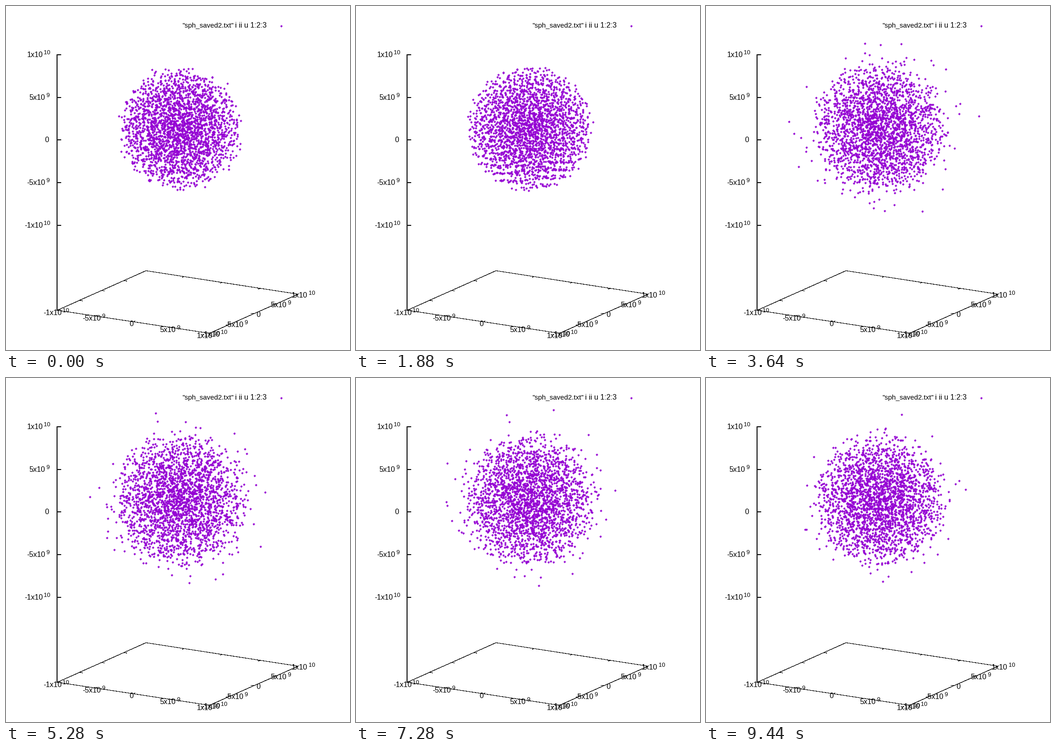
Write a matplotlib script that moves like this. It is 748 by 748 pixels and loops after 9480 ms.

```python
import numpy as np
import matplotlib.pyplot as plt
from matplotlib.animation import FuncAnimation

SIZE, DPI = 748, 88
PT = 72 / DPI              # points per pixel
STEP, FRAMES = 40, 237
VIOLET = "#9400d3"
CENTER = np.array([377.0, 267.0])
RADIUS = 137
COUNT = 2450

fig = plt.figure(figsize=(SIZE / DPI, SIZE / DPI), dpi=DPI, facecolor="white")
ax = fig.add_axes([0, 0, 1, 1])
ax.set(xlim=(0, SIZE), ylim=(SIZE, 0))
ax.axis("off")


def diamond():
    """Stepped diamond, five pixels across, from one quarter turned around."""
    quarter = [(0, -2), (1, -2), (1, -1), (2, -1), (2, 0)]
    outline = []
    for _ in range(4):
        outline += quarter[:-1] if outline else quarter
        quarter = [(1 - y, x) for x, y in quarter]
    return outline


def line(p, q):
    """Hairline between two pixels, one pixel wide and without smoothing."""
    x, y = np.transpose([p, q])
    ax.plot(x + 0.4, y + 0.6, color="black", lw=0.1 * PT,
            antialiased=False, zorder=2)


def text(x, y, s, px=16):
    ax.text(x, y, s, fontsize=px * PT, family="Liberation Sans",
            va="baseline", zorder=4)


def number(x, y, value, align):
    """Label of a tick in units of 5e9; align is 0.5 for centre, 1 for right."""
    if value == 0:
        text(x - 8.9 * align, y + 6, "0")
        return
    sign = "-" if value < 0 else ""
    mantissa, exponent = ("1", "10") if abs(value) == 2 else ("5", "9")
    base = 34.7 + 5.3 * len(sign)
    left = x - align * (base + 3 + 5 * len(exponent))
    text(left, y + 6, f"{sign}{mantissa}x10")
    text(left + base + 2, y, exponent, 12.8)


def draw_axes():
    a, b, c, d = np.array([(111, 661), (304, 575), (635, 626), (442, 711)])
    line((111, 105), a)
    for p, q in ((a, b), (b, c), (c, d), (d, a)):
        line(p, q)
    along_x, along_y = (c - b) * 0.02, (b - a) * 0.02
    for value in range(-2, 3):
        f = (value + 2) / 4
        z = round(476 - 371 * f)
        line((111, z), (119, z))
        number(93.4, z, value, 1)
        on_x, on_y = a + f * (d - a), d + f * (c - d)
        number(on_x[0] - 3.5, on_x[1] + 4.5, value, 0.5)
        number(on_y[0] + 10, on_y[1] + 2, value, 0.5)
        if abs(value) < 2:
            line(on_x, on_x + along_y)
            line(on_y, on_y - along_x)
            line(a + f * (b - a), a + f * (b - a) + along_x)
            line(b + f * (c - b), b + f * (c - b) - along_y)


def dots(x, y):
    return ax.plot(x, y, ls="none", marker=diamond(), ms=6 * PT, mew=0,
                   color=VIOLET, zorder=3)[0]


def smooth(t, start, end):
    s = np.clip((t - start) / (end - start), 0, 1)
    return s * s * (3 - 2 * s)


# ball of evenly spread directions, densest in the middle
rng = np.random.default_rng(7)
index = np.arange(COUNT) + 0.5
depth = (index / COUNT) ** 0.43
height = 2 * (index * 0.7548777 % 1) - 1
turn = 2 * np.pi * (index * 0.5698403 % 1)
flat = np.sqrt(1 - height ** 2)
heading = np.column_stack([flat * np.cos(turn), height])
settled = RADIUS * depth[:, None] * heading + rng.normal(0, 1.5, (COUNT, 2))
scatter = rng.normal(0, 5.5, (COUNT, 2))

# wandering: two slow waves for each particle and axis
rate = rng.uniform(0.8, 3.0, (2, COUNT, 2))
phase = rng.uniform(0, 2 * np.pi, (2, COUNT, 2))

# some outer particles are thrown up and fall back
hop_height = np.minimum(rng.exponential(23, COUNT), 75)
hop_height *= (depth > 0.88) & (rng.random(COUNT) < 0.35)
hop_period = rng.uniform(1.4, 2.6, COUNT)
hop_start = rng.uniform(0, 1, COUNT)


def positions(t):
    heat = smooth(t, 1.8, 3.5) * (1 - 0.25 * smooth(t, 6.2, 9.4))
    shift = scatter * np.exp(-t / 0.6)
    shift = shift + (1.2 + 8 * heat) * np.sin(rate * t + phase).sum(axis=0)
    s = (t / hop_period + hop_start) % 1
    hop = heat * hop_height * 4 * s * (1 - s)
    size = 0.97 + 0.03 * smooth(t, 0, 1.4) + 0.05 * heat * depth[:, None]
    return CENTER + settled * size + shift + heading * hop[:, None]


draw_axes()
text(383, 47, '"sph_saved2.txt"', 15)
text(498, 47, "i ii u 1:2:3")
dots([598], [43.5])
particles = dots([], [])


def update(k):
    t = max(k, 1) * STEP / 1000    # the first pose is held twice as long
    particles.set_data(*positions(t).T)
    return [particles]


anim = FuncAnimation(fig, update, frames=FRAMES, interval=STEP,
                     init_func=lambda: update(0), repeat=True,
                     repeat_delay=0, blit=False)
plt.show()
```
